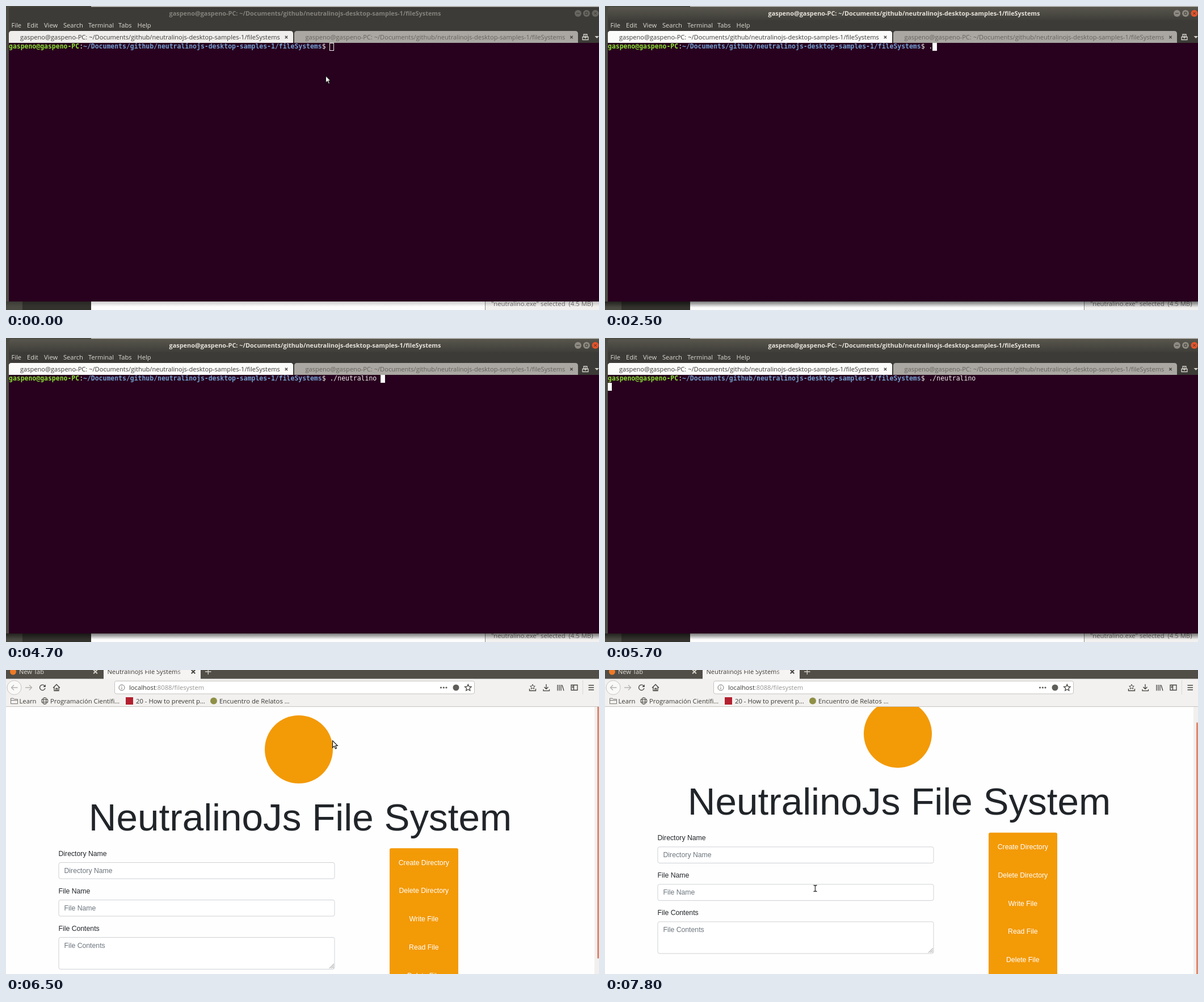
An HTML page that plays this animation: 1045 px wide and 536 px high, repeating every 8 s.

```html
<!DOCTYPE html>
<html lang="en">
<head>
<meta charset="utf-8">
<title>Terminal to browser</title>
<style>
  html, body { margin: 0; width: 100%; height: 100%; overflow: hidden; }
  body { position: relative; background: #fefefe; }
  svg, .term, .browser { position: absolute; left: 0; top: 0; }
  svg { width: 1045px; height: 536px; }
  text { font: 11.1px "Open Sans", "Noto Sans", sans-serif; white-space: pre; }
  .line { fill: none; stroke: #45443f; stroke-width: 1.3; }
  .faint { stroke: #b4b2af; }
  .light { stroke: #d5d2ca; }

  /* every animation shares one 8 s loop; 1.25% is a tenth of a second */
  .anim { animation: 8s step-end infinite; }

  /* terminal */
  .title { font-weight: 700; font-size: 10.9px; text-anchor: middle; }
  .menu { fill: #dfdbd2; }
  .focus { animation-name: focus; }
  @keyframes focus { 0% { opacity: 0 } 5% { opacity: .55 } 6.25%, 100% { opacity: 1 } }

  .row {
    position: absolute; left: 5px; top: 65px; display: flex; white-space: pre;
    font: 11.46px/13.8px "DejaVu Sans Mono", monospace; color: #f2f2f0;
  }
  .row b:first-child { color: #8ae234; }
  .row .path { color: #729fcf; }
  .typed { overflow: hidden; animation-name: type; }
  @keyframes type {
    0% { width: 0 }
    31.25% { width: 1ch }
    43.75% { width: 2ch }
    56.25% { width: 3ch }
    57.5% { width: 4ch }
    58.75%, 100% { width: 13ch }
  }
  .caret { width: 1.08ch; height: 14px; background: #fff; }
  .row .caret { animation-name: blink; }
  @keyframes blink {
    0% { background: none; box-shadow: inset 0 0 0 1px #eee }
    5%, 20%, 31.25%, 55% { background: #fff; opacity: 1 }
    12.5%, 27.5%, 47.5%, 66.25%, 100% { background: #fff; opacity: 0 }
  }
  .next { top: 79px; }
  .next .caret { animation-name: run; }
  @keyframes run { 0% { opacity: 0 } 71.25%, 100% { opacity: 1 } }
  .drift { animation-name: drift; }
  @keyframes drift {
    0% { transform: translate(563px, 122.5px) }
    10% { transform: translate(566px, 122.5px) }
    11.25% { transform: translate(570px, 122.5px) }
    12.5% { transform: translate(573.5px, 122.5px); opacity: 1 }
    31.25%, 100% { transform: translate(573.5px, 122.5px); opacity: 0 }
  }

  /* browser */
  .browser { animation-name: open; }
  @keyframes open { 0% { visibility: hidden } 73.75%, 100% { visibility: visible } }
  .loading { animation-name: loading; }
  @keyframes loading { 0% { opacity: 1 } 81.25%, 100% { opacity: 0 } }
  .loaded { animation-name: loaded; }
  @keyframes loaded { 0% { opacity: 0 } 81.25%, 100% { opacity: 1 } }
  .content { animation-name: render; }
  @keyframes render { 0% { opacity: 0 } 78.75%, 100% { opacity: 1 } }
  .throb { animation-name: throb; }
  @keyframes throb {
    0%, 73.75% { transform: translateX(0) }
    75% { transform: translateX(2px) }
    76.25% { transform: translateX(4px) }
    77.5%, 80% { transform: translateX(5px) }
    78.75% { transform: translateX(6px) }
    100% { transform: none }
  }
  .scroll { animation-name: scroll; }
  @keyframes scroll {
    0% { transform: none }
    92.5% { transform: translateY(0); animation-timing-function: steps(4) }
    97.5%, 100% { transform: translateY(-27.6px) }
  }
  .thumb { animation-name: thumb; }
  @keyframes thumb {
    0% { transform: none }
    92.5% { transform: translateY(0); animation-timing-function: steps(4) }
    97.5%, 100% { transform: translateY(28.5px) }
  }
  .mouse { animation-name: mouse; }
  @keyframes mouse {
    0% { transform: translate(575px, 124px) }
    88.75% { transform: translate(575px, 124px); animation-timing-function: steps(7) }
    97.5%, 100% { transform: translate(370.5px, 385px) }
  }
  .arrow { animation-name: arrow; }
  @keyframes arrow { 0% { opacity: 1 } 92.5%, 100% { opacity: 0 } }
  .beam { animation-name: beam; }
  @keyframes beam { 0% { opacity: 0 } 92.5%, 100% { opacity: 1 } }

  .tab { fill: #3c3b37; }
  .bookmarks { fill: #3c3b37; }
  .bookmarks text { font-size: 11.3px; }
  .page text { font: 12.26px "Liberation Sans", Arial, sans-serif; fill: #212529; }
  .page .head { font-size: 67.4px; text-anchor: middle; }
  .page .hint { fill: #6c757d; }
  .page .button { fill: #fff; text-anchor: middle; }
  .field { fill: #fff; stroke: #ced1d5; }
</style>
</head>
<body>

<div class="term">
  <svg viewBox="0 0 1045 536">
    <defs>
      <linearGradient id="bar" x2="0" y2="1">
        <stop stop-color="#58564d"/><stop offset="1" stop-color="#3f3e39"/>
      </linearGradient>
      <linearGradient id="shade" x2="0" y2="1">
        <stop stop-color="#000" stop-opacity=".4"/><stop offset="1" stop-color="#000" stop-opacity="0"/>
      </linearGradient>
      <linearGradient id="fade">
        <stop stop-color="#f5f4f2" stop-opacity="0"/><stop offset="1" stop-color="#f5f4f2"/>
      </linearGradient>
      <path id="pointer" d="M.5 .5V13L3.4 10.2 5.5 14.8 7.6 13.9 5.6 9.5H9.3Z" fill="#fff" stroke="#111" stroke-width="1.1"/>
      <path id="cross" d="M-2.2-2.2 2.2 2.2M2.2-2.2-2.2 2.2"/>
      <path id="star" d="M0-5.6 1.7-1.8 5.7-1.4 2.7 1.3 3.5 5.3 0 3.2-3.5 5.3-2.7 1.3-5.7-1.4-1.7-1.8Z"/>
    </defs>

    <path fill="#4b4a43" d="M0 0H150V536H0Z"/>
    <path fill="#33322d" d="M29 515H150V536H29Z"/>
    <path fill="#d4d3d0" d="M150 0H1045V4H150Z"/>
    <path fill="#fdfdfd" d="M150 515H844V536H150Z"/>
    <path fill="#f2f1f0" d="M844 515H1045V536H844Z"/>
    <path stroke="#8d8b87" d="M844.5 515V536"/>
    <text x="855" y="529" fill="#706e6a" style="font-size:11.3px">"neutralino.exe" selected  (4.5 MB)</text>
    <path fill="url(#shade)" opacity=".5" d="M0 521H1045V530H0Z"/>
    <path class="anim focus" fill="url(#shade)" opacity=".5" d="M0 521H1045V532H0Z"/>

    <path fill="#3c3b37" d="M5 65V6Q5 1.5 10 1.5H1045V65Z"/>
    <text class="title" x="527" y="17" fill="#85827b">gaspeno@gaspeno-PC: ~/Documents/github/neutralinojs-desktop-samples-1/fileSystems</text>
    <g fill="#686660">
      <circle cx="1008" cy="13" r="6"/><circle cx="1023" cy="13" r="6"/><circle cx="1038.5" cy="13" r="6"/>
    </g>
    <path fill="#efeeec" d="M5 65V49Q5 44 10 44H501Q506 44 506 49V65Z"/>
    <g class="anim focus">
      <path fill="url(#bar)" d="M5 25V6Q5 1.5 10 1.5H1045V25Z"/>
      <text class="title" x="527" y="17" fill="#e6e2da">gaspeno@gaspeno-PC: ~/Documents/github/neutralinojs-desktop-samples-1/fileSystems</text>
      <g fill="#8d8a82">
        <circle cx="1008" cy="13" r="6"/><circle cx="1023" cy="13" r="6"/>
      </g>
      <circle cx="1038.5" cy="13" r="6" fill="#e5542b"/>
      <path fill="#fbfbfa" d="M5 65V49Q5 44 10 44H501Q506 44 506 49V65Z"/>
    </g>
    <g fill="none" stroke="#36352f">
      <path d="M1005 13H1011M1021 11H1025V15H1021Z"/>
      <use href="#cross" x="1038.5" y="13"/>
    </g>
    <g class="menu">
      <text x="9.5" y="38">File</text><text x="37" y="38">Edit</text><text x="67" y="38">View</text>
      <text x="101" y="38">Search</text><text x="145" y="38">Terminal</text><text x="198" y="38">Tabs</text>
      <text x="231.5" y="38">Help</text>
    </g>
    <path fill="#aaa7a2" d="M508 65V49Q508 44 513 44H1003Q1008 44 1008 49V65Z"/>
    <text x="25" y="58.5" fill="#3c3b37">gaspeno@gaspeno-PC: ~/Documents/github/neutralinojs-desktop-samples-1/fileSystems</text>
    <text x="527.5" y="59" fill="#65625c">gaspeno@gaspeno-PC: ~/Documents/github/neutralinojs-desktop-samples-1/fileSystems</text>
    <g class="line">
      <use href="#cross" x="494" y="55"/><use href="#cross" x="996.5" y="55"/>
    </g>
    <path class="line light" d="M1018 54V50H1024V54M1016 54.5H1026V59.5H1016ZM1021 51.5V57.5M1018.5 55H1023.5"/>
    <path fill="#d5d2ca" d="M1037.5 53H1045L1041.3 57Z"/>
    <path fill="#28011e" d="M5 65H1045V521H5Z"/>
    <use class="anim drift" href="#pointer"/>
  </svg>
  <div class="row"><b>gaspeno@gaspeno-PC</b><span>:</span><b class="path">~/Documents/github/neutralinojs-desktop-samples-1/fileSystems</b><span>$ </span><span class="typed anim">./neutralino </span><span class="caret anim"></span></div>
  <div class="row next"><span class="caret anim"></span></div>
</div>

<div class="browser anim">
  <svg viewBox="0 0 1045 536">
    <path fill="#fefefe" d="M0 0H1045V536H0Z"/>

    <g class="content anim">
      <g class="page scroll anim">
        <circle cx="516" cy="140" r="60" fill="#f39a07"/>
        <text class="head" x="518.5" y="283">NeutralinoJs File System</text>
        <text x="92.5" y="327.5">Directory Name</text>
        <rect class="field" x="93" y="339.5" width="486" height="28.5" rx="3"/>
        <text class="hint" x="102.5" y="357.5">Directory Name</text>
        <text x="92.5" y="393.5">File Name</text>
        <rect class="field" x="93" y="405.5" width="486" height="28.5" rx="3"/>
        <text class="hint" x="102.5" y="423.5">File Name</text>
        <text x="92.5" y="459.5">File Contents</text>
        <rect class="field" x="93" y="471.5" width="486" height="56" rx="3"/>
        <text class="hint" x="102.5" y="489.5">File Contents</text>
        <path stroke="#8a8a8a" d="M570 526 578 518M573 526 578 521M576 526 578 524"/>
        <rect x="676" y="314.3" width="121" height="260" rx="3" fill="#f39a07"/>
        <text class="button" x="736.3" y="343.5">Create Directory</text>
        <text class="button" x="736.3" y="393.4">Delete Directory</text>
        <text class="button" x="736.3" y="443.3">Write File</text>
        <text class="button" x="736.3" y="493.1">Read File</text>
        <text class="button" x="736.3" y="543">Delete File</text>
      </g>
      <path fill="#f1f0ee" d="M1037 65H1045V536H1037Z"/>
      <rect class="thumb anim" x="1042" y="64.5" width="5" height="444" fill="#e2866b"/>
    </g>

    <path fill="#f2f1ef" d="M0 15H1045V65H0Z"/>
    <path fill="#504e47" d="M0 0H1045V15.5H0Z"/>
    <path stroke="#c6c4c1" d="M0 64.5H1045"/>
    <path fill="#f5f4f2" d="M172 0H343V16H172Z"/>
    <circle cx="12.5" cy="3" r="5.5" fill="#ee7a26"/>
    <text x="23" y="7" fill="#dedbd4">New Tab</text>
    <g class="line light">
      <use href="#cross" transform="translate(157.5 3) scale(1.5)"/>
      <path d="M351 3H361.5M356.3 0V8"/>
    </g>
    <g class="loading anim">
      <circle class="throb anim" cx="183" cy="3" r="1.8" fill="#8b8984"/>
      <text class="tab" x="195" y="7">localhost:8088/filesystem</text>
      <path class="line" d="M59.5 26 69 35.5M69 26 59.5 35.5"/>
    </g>
    <g class="loaded anim">
      <text class="tab" x="178.5" y="7">NeutralinoJs File Systems</text>
      <path class="line" d="M68 27.8A4.8 4.8 0 1 0 69 32"/>
      <path fill="#45443f" d="M69.8 25.5V30H65.3Z"/>
    </g>
    <path fill="url(#fade)" d="M300 0H322V14H300Z"/>
    <path fill="#f5f4f2" d="M322 0H343V14H322Z"/>
    <use class="line" href="#cross" transform="translate(330 3) scale(1.5)"/>

    <circle cx="14.5" cy="31" r="12.5" fill="#f9f9f8" stroke="#c5c3c0"/>
    <path class="line faint" d="M20.5 31H9.5M14 26.5 9.5 31 14 35.5M34 31H45.5M41 26.5 45.5 31 41 35.5"/>
    <path class="line" d="M83 31.5 89 25.5 95 31.5M85 30V36.5H93V30M88 36V32.5H90.5V36"/>

    <rect x="191.5" y="19.5" width="634" height="22.5" rx="3" fill="#fff" stroke="#c5c3c0"/>
    <g fill="none" stroke="#77756f">
      <circle cx="204" cy="31" r="5"/>
      <path d="M204 28V29.2M204 30.5V34"/>
    </g>
    <text x="217" y="35" fill="#3b3a36" style="font-size:11.2px">localhost<tspan fill="#969492">:8088/filesystem</tspan></text>
    <g fill="#5f5e59">
      <circle cx="766.5" cy="31" r="1.6"/><circle cx="771.3" cy="31" r="1.6"/><circle cx="776" cy="31" r="1.6"/>
      <circle cx="793" cy="31" r="5.5"/>
    </g>
    <g class="line">
      <use href="#star" x="814.3" y="31"/>
      <use href="#star" transform="translate(928 29.5) scale(.75)"/>
      <path d="M922.5 33V36.5H933.5V33M952 25V33M948.5 30 952 33.5 955.5 30M947 34V36.7H957.5V34"/>
      <path d="M972 26V36.5M975 26V36.5M978 26V36.5M980 26.5 983 36.5"/>
      <path d="M996 26.5H1007V35.5H996ZM1000.5 26.5V35.5M997.5 29H999.5M997.5 31H999.5"/>
      <path d="M1026.5 27H1036M1026.5 31H1036M1026.5 35H1036"/>
    </g>
    <path stroke="#dad8d5" d="M1016.5 18V43"/>

    <path d="M8.5 59.5V50H13L14.5 51.5H20.5V59.5ZM8.5 53.5H20.5" fill="none" stroke="#77756f"/>
    <g fill="none" stroke="#45443f">
      <circle cx="68.3" cy="54.5" r="5.6"/><ellipse cx="68.3" cy="54.5" rx="2.6" ry="5.6"/>
      <path d="M63 52.5H73.6M63 56.5H73.6"/>
    </g>
    <path fill="#b3202f" d="M211 48H224V61H211Z"/>
    <circle cx="366" cy="54.5" r="6" fill="#8f9045"/>
    <g class="bookmarks">
      <text x="23.5" y="58.5">Learn</text>
      <text x="78" y="58.5">Programación Científi…</text>
      <text x="229" y="58.5">20 - How to prevent p…</text>
      <text x="376" y="58.5">Encuentro de Relatos …</text>
    </g>

    <g class="mouse anim">
      <use class="arrow anim" href="#pointer"/>
      <g class="beam anim" fill="none">
        <path stroke="#fff" stroke-width="3" d="M0-5V5"/>
        <path stroke="#222" stroke-width="1.3" d="M-3-5.5Q0-5.5 0-4 0-5.5 3-5.5M0-4.5V4.5M-3 5.5Q0 5.5 0 4 0 5.5 3 5.5"/>
      </g>
    </g>
  </svg>
</div>
</body>
</html>
```
